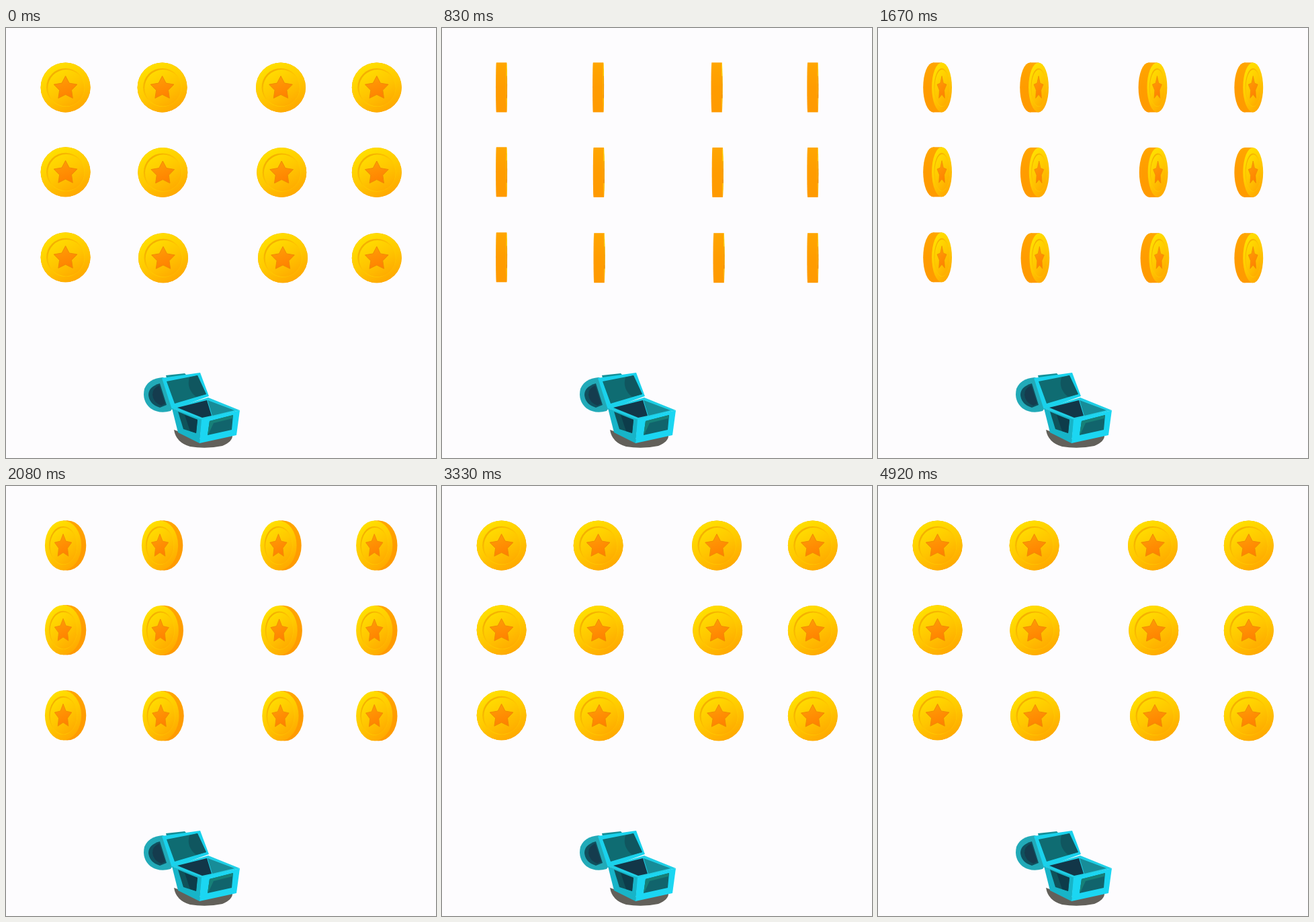
Recreate the animation shown at these times as an HTML page with a canvas. Size 640 by 640 pixels, loop 5.08 s.

```html
<!DOCTYPE html>
<html lang="en">
<head>
<meta charset="utf-8">
<title>Spinning coins</title>
<style>
  html, body { margin: 0; width: 100%; height: 100%; overflow: hidden; background: #fdfcfe; }
  canvas { display: block; width: 100vmin; height: 100vmin; }
</style>
</head>
<body>
<canvas id="stage" width="640" height="640"></canvas>
<script>
const ctx = document.getElementById('stage').getContext('2d');
const LOOP = 5080, LAST = 59;
const R = 37, THICK = 15.4;

const ROWS = [
  { y: 88.4, dy: 0, xs: [88.6, 232.6, 409, 551.8] },
  { y: 214.3, dy: 0.6, xs: [88.6, 233.3, 410.2, 551.8] },
  { y: 341.3, dy: 0.9, xs: [88.6, 234, 412, 551.8] }
];

// [step, turn in degrees, degrees per step]
const TURN = [
  [0, 0, 2], [10, 88.5, 14.5], [20, 242, 15.7], [25, 322, 15.9], [32, 430.6, 14.5],
  [40, 537, 12.5], [50, 655, 11.5], [56, 719, 2], [57, 720, 0]
];

function turnAt(k) {
  const i = TURN.findIndex(p => p[0] > k);
  if (i < 0) return 720;
  const [k0, a, va] = TURN[i - 1], [k1, b, vb] = TURN[i];
  const h = k1 - k0, u = (k - k0) / h, w = 1 - u;
  return w * w * (1 + 2 * u) * a + u * u * (3 - 2 * u) * b
       + h * u * w * (w * va - u * vb);
}

function gradient(x0, y0, x1, y1, ...colors) {
  const g = ctx.createLinearGradient(x0, y0, x1, y1);
  colors.forEach((c, i) => g.addColorStop(i / (colors.length - 1), c));
  return g;
}

function disc(r, fill) {
  ctx.beginPath();
  ctx.arc(0, 0, r, 0, 7);
  ctx.fillStyle = fill;
  ctx.fill();
}

function star() {
  ctx.beginPath();
  for (let i = 0; i < 10; i++) {
    const r = i % 2 ? 9.4 : 18.2, a = (i * 36 - 90) * Math.PI / 180;
    ctx.lineTo(r * Math.cos(a), 1.3 + r * Math.sin(a));
  }
  ctx.closePath();
  ctx.lineJoin = 'round';
  ctx.lineWidth = 1;
  ctx.strokeStyle = '#f08a04';
  ctx.fillStyle = gradient(-6, -16, 6, 18, '#ff9c06', '#ff7e00');
  ctx.fill();
  ctx.stroke();
}

function face() {
  disc(R, gradient(-18, -34, 18, 34, '#ffe000', '#ffca00', '#ffa800'));
  disc(28.5, gradient(-20, -20, 20, 20, '#f4b000', '#ffc400', '#ffd000'));
  ctx.save();
  ctx.translate(0.9, 0.9);
  disc(27.2, gradient(-14, -24, 14, 24, '#ffda00', '#ffc600', '#ffac00'));
  ctx.restore();
  star();
}

function coin(x, y, deg) {
  const phi = deg * Math.PI / 180;
  const a = phi + 0.087 * Math.sin(2 * phi);
  const side = Math.cos(a) < 0 ? -1 : 1;
  const c = Math.max(Math.abs(Math.cos(a)), 0.002);
  const s = side * Math.sin(a);
  const off = s * Math.abs(s) * THICK / 2;
  ctx.save();
  ctx.translate(x, y);
  ctx.fillStyle = gradient(0, -R, 0, R, '#ffa600', '#ff9c00', '#ff9a00');
  ctx.beginPath();
  ctx.ellipse(-off, 0, R * c, R, 0, 0, 7);
  ctx.fill();
  ctx.fillRect(-Math.abs(off), -R, 2 * Math.abs(off), 2 * R);
  ctx.translate(off, 0);
  ctx.scale(c, 1);
  face();
  ctx.restore();
}

function shape(fill, d) {
  ctx.fillStyle = fill;
  ctx.fill(new Path2D(d));
}

function chest() {
  // shadow
  shape('#62605a', 'M250 598Q253 617 274 623Q298 627 322 622Q338 615 337 606L288 612Z');
  // round end of the lid
  shape('#22aab8', 'M233 520Q212 522 206 537Q202 555 215 566Q228 575 245 570L252 560L240 522Z');
  shape('#10505e', 'M229 529Q212 534 212 546Q213 560 229 565L239 561Z');
  shape('#153c4e', 'M228 532Q218 536 218 546Q219 557 231 562L237 559Z');
  // lid
  shape('#149098', 'M238 517L266 514L269 517L239 521Z');
  shape('#1ad2ec', 'M232 521L289 513L302 548L247 568Z');
  shape('#0f6c72', 'M239 526L285 517L298 545L251 559Z');
  shape('#10565f', 'M273 520L285 517L298 545L283 549Q268 537 273 520Z');
  // opening
  shape('#1fcfe6', 'M247 566L301 550L348 569L291 584Z');
  shape('#123648', 'M255 565L299 554L306 577L292 580Z');
  shape('#178c98', 'M300 554L340 569L307 577Z');
  // body
  shape('#17b4c8', 'M247 566L292 583L288 618L256 602Z');
  shape('#0f525a', 'M256 571L285 583L283 603L264 597Z');
  shape('#0d3c4a', 'M266 576L285 583L283 603L274 600Z');
  shape('#1bd6f2', 'M291 583L348 569L343 606L288 618Z');
  shape('#11646c', 'M303 585L338 576L336 598L300 606Z');
  shape('#178078', 'M303 585L338 576L337 581L309 588L302 603L300 606Z');
}

function draw(now) {
  const cs = Math.floor(now % LOOP / 10);
  const step = Math.min(LAST, Math.ceil((cs + 0.5) * 0.12) - 1);
  const deg = turnAt(step);
  ctx.fillStyle = '#fdfcfe';
  ctx.fillRect(0, 0, 640, 640);
  for (const { y, dy, xs } of ROWS)
    xs.forEach((x, i) => coin(x, y + (i ? dy : 0), deg));
  chest();
}

const start = performance.now();
function tick() {
  draw(performance.now() - start);
  requestAnimationFrame(tick);
}
tick();
</script>
</body>
</html>
```
